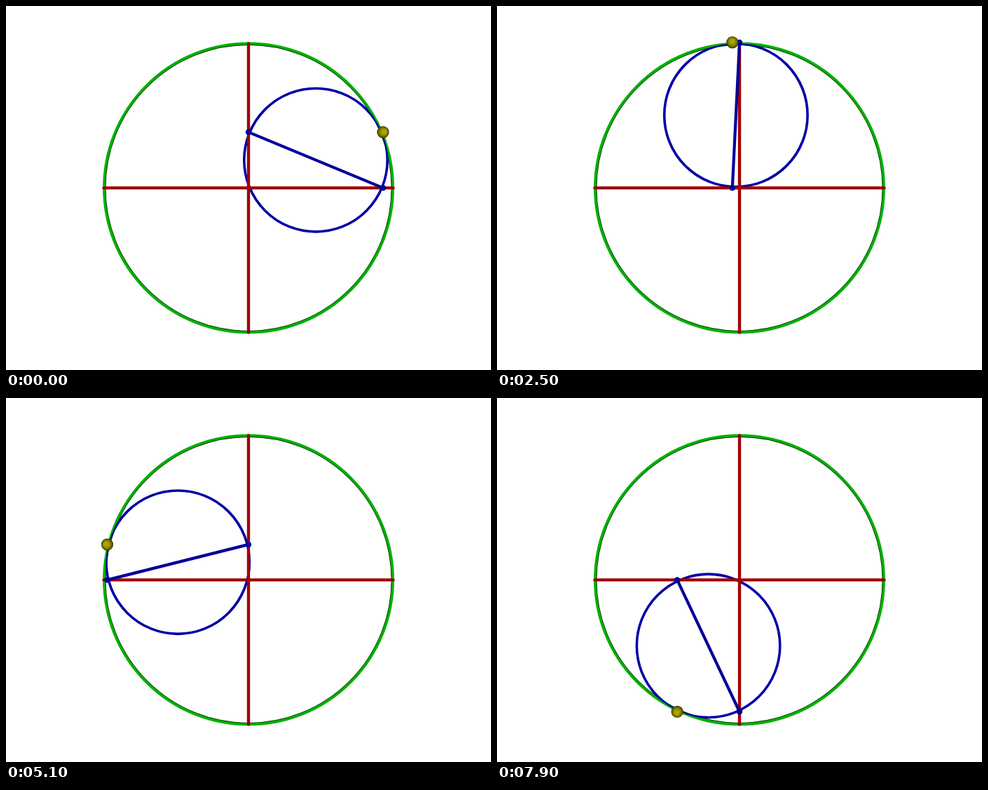
These frames come from a looping animation (692 by 519 pixels, 8000 ms). An HTML page with a canvas:

```html
<!DOCTYPE html>
<html lang="en">
<head>
<meta charset="utf-8">
<title>Rolling circle</title>
<style>
html, body { margin: 0; width: 100%; height: 100%; overflow: hidden; background: #fff; }
canvas { display: block; }
</style>
</head>
<body>
<canvas id="stage" width="692" height="519"></canvas>
<script>
const ctx = document.getElementById('stage').getContext('2d');
const CX = 346, CY = 259.4;
const REACH = 207.8;            // length of the sliding rod
const BIG = 206.1, SMALL = 102.2;
const LOOP = 8000, STEP = 100;
const BLUE = '#0000a6', ROD = '#000098', RED = '#a00000';

function ring(x, y, r, width, color) {
  ctx.lineWidth = width;
  ctx.strokeStyle = color;
  ctx.beginPath();
  ctx.arc(x, y, r, 0, Math.PI * 2);
  ctx.stroke();
}

function bar(x1, y1, x2, y2, width, color) {
  ctx.lineWidth = width;
  ctx.strokeStyle = color;
  ctx.lineCap = 'round';
  ctx.beginPath();
  ctx.moveTo(x1, y1);
  ctx.lineTo(x2, y2);
  ctx.stroke();
}

function disc(x, y, r, fill) {
  ctx.fillStyle = fill;
  ctx.beginPath();
  ctx.arc(x, y, r, 0, Math.PI * 2);
  ctx.fill();
}

// The two tubes meet midway between their centre lines: an ellipse
// whose foci are the centres of both circles.
function rollingCircle(mx, my, angle) {
  const a = (BIG + SMALL) / 2;
  const c = Math.hypot(mx - CX, my - CY) / 2;
  ctx.save();
  ctx.beginPath();
  ctx.ellipse((CX + mx) / 2, (CY + my) / 2, a, Math.sqrt(a * a - c * c), -angle, 0, Math.PI * 2);
  ctx.clip();
  ring(mx, my, SMALL, 3.6, BLUE);
  ctx.restore();
}

function ball(x, y, angle) {
  const hx = x + 2.2 * Math.cos(angle), hy = y - 2.2 * Math.sin(angle);
  const g = ctx.createRadialGradient(hx, hy, 0, x, y, 8.6);
  g.addColorStop(0, '#b4ae00');
  g.addColorStop(0.45, '#a09a00');
  g.addColorStop(0.8, '#696500');
  g.addColorStop(1, '#2e2c00');
  disc(x, y, 8.6, g);
}

function draw(time) {
  const step = Math.floor((time % LOOP) / STEP);
  const angle = (step + 8) * Math.PI / 64;
  const px = CX + REACH * Math.cos(angle);
  const py = CY - REACH * Math.sin(angle);

  ctx.fillStyle = '#fff';
  ctx.fillRect(0, 0, 692, 519);

  ring(CX, CY, BIG - 1.9, 1.4, '#003000');
  ring(CX, CY, BIG, 3.6, '#00b000');
  rollingCircle((CX + px) / 2, (CY + py) / 2, angle);

  bar(CX - 206.5, CY, CX + 206.5, CY, 4.4, RED);
  bar(CX, CY - 206, CX, CY + 206, 4.4, RED);

  bar(px, CY, CX, py, 4.2, ROD);
  disc(px, CY, 4.2, ROD);
  disc(CX, py, 4.2, ROD);
  ball(px, py, angle);
}

let start;
function tick(now) {
  if (start === undefined) start = now;
  draw(Math.max(0, now - start));
  requestAnimationFrame(tick);
}
draw(0);
requestAnimationFrame(tick);
</script>
</body>
</html>
```
